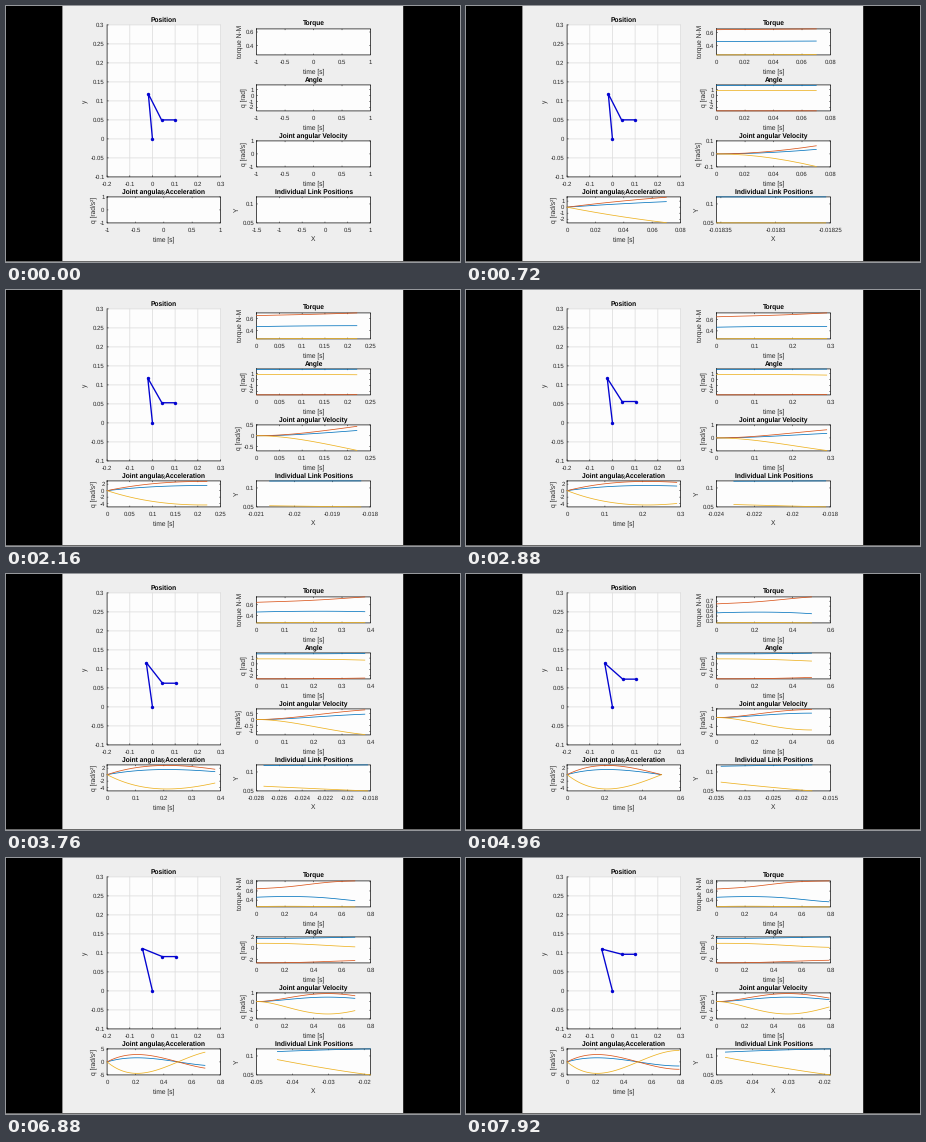
Recreate the animation shown at these times as a matplotlib script. Size 454x256 px, loop 8000 ms.

```python
import math

import numpy as np
import matplotlib.pyplot as plt
from matplotlib.animation import FuncAnimation
from matplotlib.collections import LineCollection
from matplotlib.patches import Rectangle

W, H, DPI = 454, 256, 100
FRAMES, INTERVAL = 100, 80
PT = 72 / DPI
TICK_PX, LABEL_PX = 6.0, 6.6
INK = "#262626"
ARM = "#0404d0"
COLORS = ("#0072bd", "#d95319", "#edb120")
GLYPH = {"-": 0.333, ".": 0.278}

plt.rcParams["font.family"] = "Liberation Sans"
plt.rcParams["text.hinting"] = "none"
plt.rcParams["path.snap"] = False

fig = plt.figure(figsize=(W / DPI, H / DPI), dpi=DPI, facecolor="black")
ax = fig.add_axes([0, 0, 1, 1])
ax.set_xlim(0, W)
ax.set_ylim(H, 0)
ax.set_autoscale_on(False)
ax.axis("off")


# --- arm: three links, joint-space quintic over one second ---

L1, L2, L3 = 0.12, 0.09, 0.06
LOAD, WEIGHT2, WEIGHT1 = 4.33, 4.6, 2.1


def inverse(x, y):
    """Joint angles for a level last link whose base is at (x, y)."""
    r2 = x * x + y * y
    lift = math.acos((L1**2 + r2 - L2**2) / (2 * L1 * math.sqrt(r2)))
    q1 = math.atan2(y, x) + lift
    q2 = -math.acos((r2 - L1**2 - L2**2) / (2 * L1 * L2))
    return np.array([q1, q2, -q1 - q2])


START = inverse(0.04, 0.05)
DELTA = inverse(0.04, 0.10) - START


def simulate(last):
    t = 0.01 * np.arange(last + 1)
    s = 10 * t**3 - 15 * t**4 + 6 * t**5
    ds = 30 * t**2 - 60 * t**3 + 30 * t**4
    dds = 60 * t - 180 * t**2 + 120 * t**3
    q = START[:, None] + DELTA[:, None] * s
    x1, y1 = L1 * np.cos(q[0]), L1 * np.sin(q[0])
    x2 = x1 + L2 * np.cos(q[0] + q[1])
    y2 = y1 + L2 * np.sin(q[0] + q[1])
    x3 = x2 + L3
    mid = (x1 + x2) / 2
    boost = 1 + 0.05 * dds / 9.81
    torque = boost * np.array([
        LOAD * x3 + WEIGHT2 * mid + WEIGHT1 * x1 / 2,
        LOAD * (x3 - x1) + WEIGHT2 * (mid - x1),
        LOAD * (x3 - x2),
    ])
    return dict(t=t * (1 + 1e-5), q=q, dq=DELTA[:, None] * ds,
                ddq=DELTA[:, None] * dds, torque=torque, x1=x1,
                heights=np.array([y1, y2]),
                joints=([0, x1[-1], x2[-1], x3[-1]],
                        [0, y1[-1], y2[-1], y2[-1]]))


# --- axis limits and ticks ---

def steps(span):
    for e in range(-9, 3):
        for m in (1, 2, 5):
            step = m * 10.0**e
            if step > span / 12:
                yield step


def ticks(lo, hi, step):
    first = math.ceil(lo / step - 1e-6)
    last = math.floor(hi / step + 1e-6)
    return [round(k * step, 10) for k in range(first, last + 1)]


def name(v):
    return f"{v:.10g}"


def outward(lo, hi, step):
    return (math.floor(lo / step + 1e-6) * step,
            math.ceil(hi / step - 1e-6) * step)


def roomy(lo, hi, step, width):
    chars = max((len(name(v)) for v in ticks(lo, hi, step)), default=1)
    return width * step / (hi - lo) >= chars * 3.3 + 2


def widen(lo, hi):
    return (lo - 1, hi + 1) if hi - lo < 1e-12 else (lo, hi)


def x_limits(lo, hi, width):
    """Round each end to a tick unless that leaves a wide gap."""
    lo, hi = widen(lo, hi)
    span = hi - lo
    for step in steps(span):
        a, b = outward(lo, hi, step)
        if (b - a) / step < 5.1 and roomy(a, b, step, width):
            break
    left, right = lo - a, b - hi
    return (a if left < 0.21 * (span + left) else lo,
            b if right < 0.21 * (span + right) else hi)


def y_limits(lo, hi):
    """Round both ends to coarse ticks, or to a fine step if too loose."""
    lo, hi = widen(lo, hi)
    span = hi - lo
    for step in steps(span):
        a, b = outward(lo, hi, step)
        if (b - a) / step < 3.1:
            break
    if span > 0.77 * (b - a):
        return a, b
    return outward(lo, hi, 10.0 ** math.floor(math.log10(span / 5)))


def auto_ticks(lo, hi, width=None):
    most = 6 if width else 4
    for step in steps(hi - lo):
        vals = ticks(lo, hi, step)
        if len(vals) <= most and (not width or roomy(lo, hi, step, width)):
            return vals


# --- drawing ---

def text(x, y, s, px=LABEL_PX, **kw):
    kw = {"ha": "center", "va": "baseline", "color": INK, **kw}
    return ax.text(x, y, s, fontsize=px * PT, **kw)


def line(x, y, color, px, **kw):
    return ax.plot(x, y, color=color, lw=px * PT, **kw)[0]


def fill(x, y, w, h, color, z=0):
    ax.add_patch(Rectangle((x, y), w, h, fc=color, ec="none", zorder=z))


class Panel:
    def __init__(self, box, title, xlabel, ylabel, boxed=True):
        self.box, self.ylabel, self.boxed = box, ylabel, boxed
        x0, y0, x1, y1 = box
        self.cx, self.cy = (x0 + x1) / 2, (y0 + y1) / 2
        fill(x0, y0, x1 - x0, y1 - y0, "#fdfdfd", 1)
        text(self.cx, y0 - 3.3, title, weight="bold", color="black")
        text(self.cx, y1 + 18.5, xlabel)
        if boxed:
            line([x0, x1, x1, x0, x0], [y0, y0, y1, y1, y0], INK, 0.8)
        else:
            line([x0, x0, x1], [y0, y1, y1], INK, 0.8)

    def scale(self, xlim, ylim):
        self.xlim, self.ylim = xlim, ylim

    def px(self, x):
        x0, _, x1, _ = self.box
        lo, hi = self.xlim
        return x0 + (np.asarray(x) - lo) / (hi - lo) * (x1 - x0)

    def py(self, y):
        _, y0, _, y1 = self.box
        lo, hi = self.ylim
        return y1 - (np.asarray(y) - lo) / (hi - lo) * (y1 - y0)

    def axes(self, xticks, yticks, size=1.2):
        x0, y0, x1, y1 = self.box
        marks, out = [], []
        for v in xticks:
            x = float(self.px(v))
            marks.append([(x, y1), (x, y1 - size)])
            if self.boxed:
                marks.append([(x, y0), (x, y0 + size)])
            out.append(text(x, y1 + 9.5, name(v), TICK_PX))
        wide = 0
        for v in yticks:
            y = float(self.py(v))
            marks.append([(x0, y), (x0 + size, y)])
            if self.boxed:
                marks.append([(x1, y), (x1 - size, y)])
            out.append(text(x0 - 2.5, y + 2.1, name(v), TICK_PX, ha="right"))
            wide = max(wide, TICK_PX * sum(GLYPH.get(c, 0.556)
                                           for c in name(v)))
        out.append(text(x0 - 8 - wide, self.cy, self.ylabel, rotation=90,
                        va="center"))
        coll = LineCollection(marks, colors=INK, linewidths=0.6 * PT, zorder=2)
        ax.add_collection(coll, autolim=False)
        return out + [coll]

    def curves(self, x, ys, ystep=None, colors=COLORS):
        """Plot curves; a given ystep keeps the vertical limits tight."""
        width = self.box[2] - self.box[0]
        lo, hi = ys.min(), ys.max()
        self.scale(x_limits(x.min(), x.max(), width),
                   (lo, hi) if ystep else y_limits(lo, hi))
        yt = ticks(lo, hi, ystep) if ystep else auto_ticks(*self.ylim)
        out = self.axes(auto_ticks(*self.xlim, width), yt)
        if len(x) > 1:
            out += [line(self.px(x), self.py(y), c, 0.75, zorder=3)
                    for y, c in zip(ys, colors)]
        return out


def right_box(top):
    return (250.6, top, 364.5, top + 26)


fill(56.4, 0, 340.8, H, "#eeeeee")
fill(0, H - 1, W, 1, "#6a6a6a")

place = Panel((101.1, 18.9, 214.5, 170.9), "Position", "x", "y", boxed=False)
torque = Panel(right_box(22.9), "Torque", "time [s]", "torque N-M")
angle = Panel(right_box(78.9), "Angle", "time [s]", "q [rad]")
speed = Panel(right_box(134.9), "Joint angular Velocity", "time [s]",
              "q [rad/s]")
links = Panel(right_box(190.9), "Individual Link Positions", "X", "Y")
accel = Panel((101.1, 190.9, 214.5, 216.9), "Joint angular Acceleration",
              "time [s]", "q [rad/s²]")

place.scale((-0.2, 0.3), (-0.1, 0.3))
XT, YT = ticks(-0.2, 0.3, 0.1), ticks(-0.1, 0.3, 0.05)
for v in XT[1:]:
    line([place.px(v)] * 2, place.box[1::2], "#dedede", 0.8, zorder=1.5)
for v in YT[1:]:
    line(place.box[::2], [place.py(v)] * 2, "#dedede", 0.8, zorder=1.5)
place.axes(XT, YT, 1.5)
arm = line([], [], ARM, 1.35, marker="o", ms=3.4 * PT, mew=0, zorder=4)

live = []


def draw(i):
    while live:
        live.pop().remove()
    # every fifth picture is held
    d = simulate(i - (i + 2) // 5)
    x, y = d["joints"]
    arm.set_data(place.px(x), place.py(y))
    tau = d["torque"]
    fine = np.ptp(tau) > 0.5 and tau.max() < 0.8
    live.extend(torque.curves(d["t"], tau, 0.1 if fine else 0.2))
    live.extend(angle.curves(d["t"], d["q"]))
    live.extend(speed.curves(d["t"], d["dq"]))
    live.extend(accel.curves(d["t"], d["ddq"]))
    live.extend(links.curves(d["x1"], d["heights"], 0.05, COLORS[::2]))
    return [arm]


anim = FuncAnimation(fig, draw, frames=FRAMES, interval=INTERVAL,
                     init_func=lambda: draw(0), repeat=True, repeat_delay=0,
                     blit=False)
plt.show()
```
